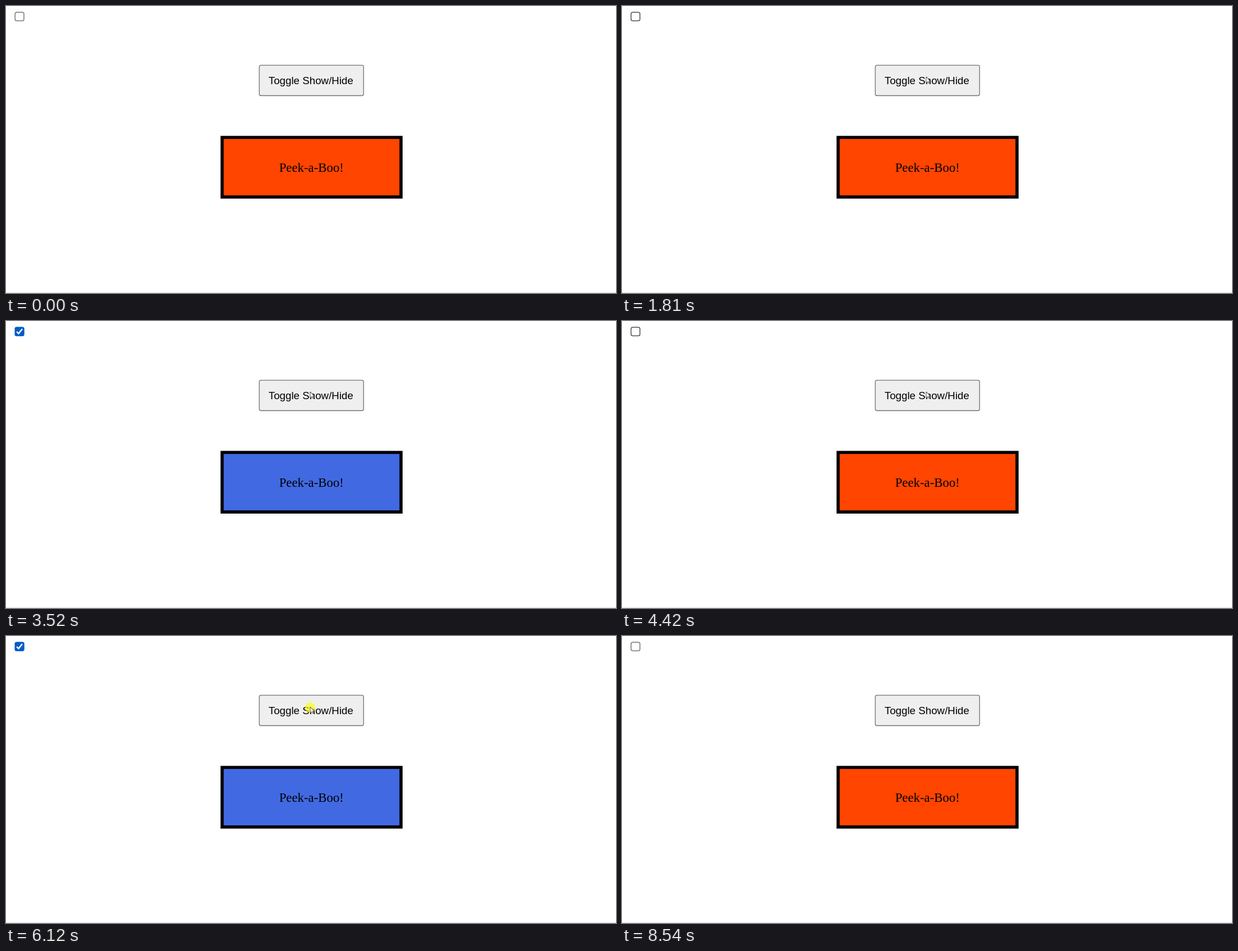
Recreate the animation shown at these times as an HTML page. Size 1089 by 514 pixels, loop 8950 ms.

```html
<!DOCTYPE html>
<html lang="en">
<head>
<meta charset="utf-8">
<title>Toggle show/hide</title>
<style>
  html, body { margin: 0; width: 100%; height: 100%; overflow: hidden; background: #fff; }
  svg { display: block; width: 100%; height: 100%; }
  .label { font: 18.75px "Liberation Sans", Arial, sans-serif; }
  .boo { font: 22.8px "Liberation Serif", "Times New Roman", serif; }
</style>
</head>
<body>
<svg viewBox="0 0 1089 514">
  <rect y="513" width="1089" height="1" fill="#ddd"/>
  <rect id="check" x="16.2" y="11.2" width="15.8" height="15.4" rx="2.8" stroke-width="1.5"/>
  <path id="tick" d="M19.2 19.2 22.4 22.5 29 14.2" fill="none" stroke="#fff" stroke-width="2.5"/>
  <rect x="452.2" y="106.1" width="186.2" height="54.4" rx="3" fill="#efefef" stroke="#707070" stroke-width="1.3"/>
  <text class="label" x="468.8" y="139.6">Toggle Show/Hide</text>
  <rect x="383" y="232.6" width="325" height="112.3"/>
  <rect id="panel" x="388.6" y="238.1" width="313.8" height="101.1"/>
  <text class="boo" x="487.7" y="297">Peek-a-Boo!</text>
  <circle id="glow" cx="543" cy="128" r="9.2" fill="#ff0" fill-opacity=".65"/>
  <path id="cursor" d="M0 0V10.4L2.4 8.3 4 11.6 5.5 10.9 4 7.8H7.2Z" fill="#fff" stroke="#333" stroke-width=".8"/>
</svg>
<script>
  const LOOP = 8950;
  const [check, tick, panel, glow, cursor] =
    ['check', 'tick', 'panel', 'glow', 'cursor'].map(id => document.getElementById(id));

  const toggles = [3420, 4420, 5320, 6220];
  const clicks = [[3320, 3520], [4320, 4420], [5230, 5320], [6120, 6220]];
  const REST = [543, 127];

  const ease = u => u * u * (3 - 2 * u);
  const bezier = (a, b, c, u) =>
    a.map((p, i) => (1 - u) ** 2 * p + 2 * u * (1 - u) * b[i] + u * u * c[i]);
  const stepAt = (t, start, size) => Math.floor((t - start) / size + 1e-6);

  // The pointer moves in steps of about 100 ms.
  function pointer(t) {
    if (t < 490 || t >= 8540) return null;
    if (t < 1810) {
      const n = stepAt(t, 490, 101.5);
      if (n <= 8) return bezier([960, 486], [800, 375], [588, 160], ease(n / 8));
      return bezier([588, 160], [562, 138], REST, 1 - (1 - (n - 8) / 5) ** 2);
    }
    if (t < 7330) return REST;
    const n = stepAt(t, 7330, 100.8);
    if (n <= 8) return bezier([566, 153], [765, 325], [942, 449], ease(n / 8));
    return bezier([942, 449], [1000, 485], [1055, 507], Math.min(1, (n - 8) / 3));
  }

  function show(el, on) {
    el.setAttribute('visibility', on ? 'visible' : 'hidden');
  }

  function draw(t) {
    const on = toggles.filter(time => t >= time).length % 2 === 1;
    const hover = t >= 1410 && t < 7430;
    check.setAttribute('fill', on ? '#005cc8' : '#fff');
    check.setAttribute('stroke', on ? '#005cc8' : hover ? '#4f4f4f' : '#767676');
    panel.setAttribute('fill', on ? '#4169e1' : '#ff4500');
    show(tick, on);
    show(glow, clicks.some(([from, to]) => t >= from && t < to));
    const pos = pointer(t);
    show(cursor, pos);
    if (pos) cursor.setAttribute('transform', `translate(${pos[0]} ${pos[1]})`);
  }

  const start = performance.now();
  function tickFrame() {
    draw((performance.now() - start) % LOOP);
    requestAnimationFrame(tickFrame);
  }
  tickFrame();
</script>
</body>
</html>
```
